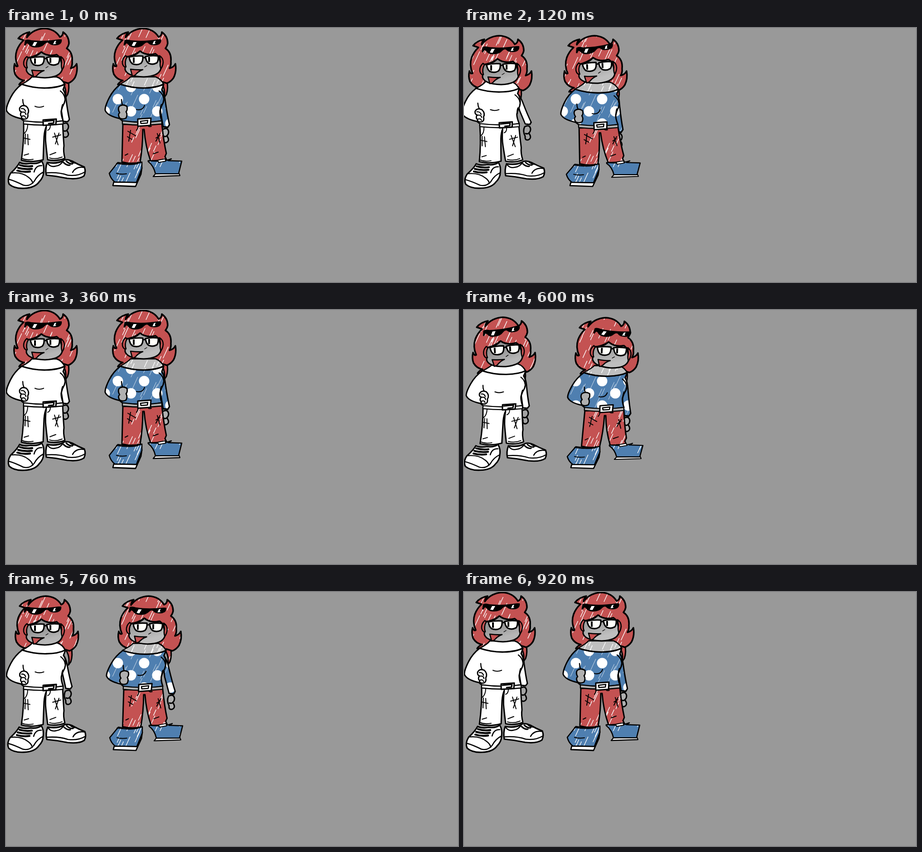
Recreate the animation shown at these times as an HTML page with a canvas. Size 998x561 px, loop 1.12 s.

```html
<!DOCTYPE html>
<html lang="en">
<head>
<meta charset="utf-8">
<title>Idle bounce</title>
<style>
html, body { margin: 0; width: 100%; height: 100%; overflow: hidden; background: #999; }
canvas { display: block; }
</style>
</head>
<body>
<canvas id="stage" width="998" height="561"></canvas>
<script>
const ctx = document.getElementById('stage').getContext('2d');
const RED = '#c45252', BLUE = '#4f7fb0', SKIN = '#b0b0b0', WHITE = '#fff';
const P = d => new Path2D(d);

const hair = P('M48 124L29 125Q31 120 40 116Q27 114 20 102Q16 91 19 79Q22 87 26 84Q18 66 24 49Q29 36 39 27L27 23Q36 12 52 9Q46 15 46 21Q60 2 85 1Q108 2 119 20Q126 17 126 9Q139 18 139 34Q138 40 134 45Q148 54 146 74Q147 82 143 89Q152 87 156 79Q159 96 152 110Q146 119 137 122L124 118Z');
const tail = P('M137 115Q141 133 136 147L131 154Q136 130 118 112Z');
const face = P('M45 94L45 66Q66 66 78 53Q92 64 112 59Q123 66 124 92Q119 109 86 110Q50 109 45 94Z');
const locks = P('M46 63Q38 70 39 80Q41 89 47 88Q43 77 49 66ZM121 63Q129 68 129 78Q128 87 124 92Q121 84 123 76Z');
const bangs = P('M45 66Q64 64 78 53Q92 64 112 59L121 66');
const lenses = P('M54 66Q68 63 84 64Q85 75 80 80Q72 85 61 81Q55 76 54 66ZM90 65Q104 62 118 64Q119 74 115 79Q106 84 97 80Q91 76 90 65ZM84 68L90 67M118 67L123 66');
const pupils = P('M62 67h4v12h-4ZM96 66h4v11h-4Z');
const mouth = P('M57 93Q72 95 84 94Q76 97 71 102Q66 108 61 108Z');
const nose = P('M88 88L93 85');
const shades = P('M40 38L42 27Q47 24 56 27Q84 30 117 25L123 25Q124 31 120 35Q114 39 106 38Q98 38 94 33Q90 31 86 35Q78 44 64 43Q54 43 49 35L46 34L43 39Z');
const glints = P('M62 31L69 31L64 40L58 39ZM107 29L111 28L109 33L111 35L104 36Z');

const torso = P('M35 124Q19 136 10 154Q0 174 1 182Q6 194 33 200L40 206Q85 213 126 205Q121 191 122 183Q124 174 129 165Q134 148 126 136L130 125Q124 112 112 108L57 108Q52 115 35 124Z');
const neck = P('M34 124Q60 133 88 132.5Q115 132 130 124Q124 113 112 108L57 108Q52 114 34 124Z');
const neckline = P('M34 124Q60 133 88 132.5Q115 132 130 124');
const folds = P('M37 158Q37 172 46 177M120 139Q129 146 130 156M125 169Q122 177 123 182');
const sleeve = P('M122 132Q131 138 133 160Q136 184 140 202L136 207L126 206L121 175Z');
const palm = P('M125 212Q136 206 138 217Q138 223 134 226Q142 237 133 241Q125 243 126 233Q120 222 125 212ZM127 227Q132 229 134 226');
const fist = P('M45 173Q35 168 30 177Q29 184 34 185Q30 192 34 195Q34 203 44 201Q50 198 48 190Q53 181 45 173Z');
const fingers = P('M34 178Q41 177 43 184M34 186Q43 184 44 191M35 195Q42 192 43 198');
const grip = P('M32 173Q40 167 49 173Q51 181 47 185Q51 191 47 199Q39 203 33 199Q28 191 33 187Q28 179 32 173Z');

const jeans = P('M39 209Q40 250 34 292Q55 298 82 291Q83 262 84 240Q85 226 89 217Q86 240 88 256Q90 275 92 291Q111 295 130 288Q126 272 128 260Q126 235 125 208Z');
const jeansInk = P('M40 233Q48 227 48 212M43 234L42 256M48 235L49 258M39 243L53 246M107 232L115 258M117 232L109 256M103 241L121 236M98 214Q98 224 92 226M40 281L50 278M35 288Q46 293 60 290M97 280L110 275M96 287Q110 291 124 285');
const pants = P('M40 213Q39 252 38 296Q58 301 78 297Q84 262 84 224L87 224Q90 262 101 293Q118 294 136 290L133 284L136 277Q130 250 126 211Z');
const pantsInk = P('M51 228L68 238M57 226L53 250M50 240L60 246M116 233L122 254M122 233L113 250M113 243L121 238M74 212Q74 222 70 226M93 212Q96 220 103 217M45 281L51 278M107 278L118 274');

const sneakL = P('M30 297Q25 307 10 321Q2 334 7 345Q18 355 40 354Q64 353 73 340Q83 330 83 318Q85 304 79 294Q70 301 55 299Q40 302 30 297Z');
const sneakLInk = P('M6 334Q20 338 38 347Q52 351 62 339Q70 324 83 318M13 320Q36 318 50 330Q58 336 59 343M79 304Q66 303 62 318');
const lacesL = P('M31 303Q44 307 58 305M27 309Q42 313 57 311M25 315Q38 319 53 317');
const sneakR = P('M91 297Q86 311 89 325Q112 327 135 332Q160 335 172 327Q177 317 173 307Q160 302 146 294Q132 288 126 293Q112 301 91 297Z');
const sneakRInk = P('M89 320Q116 318 136 325Q158 328 174 318M147 319Q154 305 173 308M93 300Q99 308 110 305Q120 304 126 294');
const lacesR = P('M127 297Q134 304 141 303M133 294Q140 301 147 300M140 292Q146 298 153 298');
const bootL = P('M29 297L10 321Q13 333 22 340L70 341L82 310L82 296Q64 303 29 297Z');
const soleL = P('M20 340L18 348L68 350L80 323L82 309L70 341Z');
const bootLInk = P('M26 299Q52 304 72 300L73 296M26 321Q36 324 48 322');
const bootR = P('M96 295Q108 304 112 322L163 322L170 294L140 293L147 289Q130 296 96 293Z');
const soleR = P('M112 322L107 328L166 326L164 321Z');
const cuffR = P('M117 292L133 289L135 294L119 297Z');
const bust = P('M70 180Q84 183 88 171');
const crease = P('M64 173Q73 177 83 173');

// Fixed screen textures: slanted scratches and polka dots.
let seed = 11;
const rnd = () => (seed = seed * 16807 % 2147483647) / 2147483647;
const hatch = new Path2D(), dots = new Path2D();
for (let i = 0; i < 300; i++) {
  const x = rnd() * 410, y = rnd() * 350 - 10, len = 9 + rnd() * 20;
  hatch.moveTo(x, y);
  hatch.lineTo(x - len * .46, y + len);
}
for (let row = 0; row < 4; row++) {
  for (let col = 0; col < 4; col++) {
    const x = 218 + col * 58 + (row % 2 ? 29 : 0), y = 130 + row * 27;
    dots.moveTo(x + 11.5, y);
    dots.arc(x, y, 11.5, 0, 7);
  }
}

function ink(path, w = 2, color = '#000') {
  ctx.strokeStyle = color;
  ctx.lineWidth = w;
  ctx.stroke(path);
}

function flat(path, fill) {
  ctx.fillStyle = fill;
  ctx.fill(path);
}

function paint(path, fill, w = 3, scratched = false, spotted = false) {
  flat(path, fill);
  if (scratched) {
    ctx.save();
    ctx.clip(path);
    ctx.setTransform(1, 0, 0, 1, 0, 0);
    if (spotted) flat(dots, WHITE);
    ink(hatch, spotted ? 1 : 1.4, spotted ? 'rgba(255,255,255,.75)' : WHITE);
    ctx.restore();
  }
  ink(path, w);
}

// Shear and stretch a part so its top and bottom follow separate offsets.
function span(ox, y0, x0, dy0, y1, x1, dy1) {
  const kx = (x1 - x0) / (y1 - y0), ky = (dy1 - dy0) / (y1 - y0);
  ctx.setTransform(1, 0, kx, 1 + ky, ox + x0 - kx * y0, dy0 - ky * y0);
}

function place(ox, x, y, turn = 0, cx = 0, cy = 0) {
  ctx.setTransform(1, 0, 0, 1, ox + x + cx, y + cy);
  ctx.rotate(turn);
  ctx.translate(-cx, -cy);
}

function belt(color) {
  paint(P('M39 205Q84 211 126 205L126 212Q84 217 39 212Z'), color ? SKIN : WHITE, 2.4);
  if (color) {
    paint(P('M73 201L102 199L101 215L73 217Z'), WHITE, 3);
    ink(P('M79 206L95 204L94 210L80 211Z'), 2.6);
  } else {
    paint(P('M82 203L111 201L110 213L82 215Z'), WHITE, 3.2);
    ink(P('M85 206L106 204L105 210L94 211'), 3);
  }
}

function drawFigure(ox, pose, color) {
  const [hx, hy, fx, fy, sx, sy, turn, nx, ny, wx, wy, ax, ay, tx, lx, rx] = pose;
  const ankle = wy * .5;

  place(ox, tx, hy * .9);
  paint(tail, RED, 3, true);
  place(ox, hx, hy);
  paint(hair, RED, 3.5, true);

  place(ox, ax, ay);
  paint(palm, color ? SKIN : '#a3a3a3', 3);
  span(ox, 135, nx, ny, 205, ax, ay);
  paint(sleeve, color ? BLUE : WHITE, 3, color, color);

  span(ox, 210, wx, wy, 295, (lx + rx) / 2, ankle);
  paint(color ? pants : jeans, color ? RED : WHITE, 3, color);
  ink(color ? pantsInk : jeansInk, 2);

  span(ox, 295, rx, ankle, 350, rx, 0);
  if (color) {
    paint(soleR, WHITE, 2.3);
    paint(bootR, BLUE, 2.6, true);
    paint(cuffR, WHITE, 2);
  } else {
    paint(sneakR, WHITE, 3.2);
    ink(sneakRInk, 2.6);
    ink(lacesR, 3.2);
  }
  span(ox, 295, lx, ankle, 350, lx, 0);
  if (color) {
    paint(soleL, WHITE, 2.8);
    paint(bootL, BLUE, 2.6, true);
    ink(bootLInk, 2);
  } else {
    paint(sneakL, WHITE, 3.2);
    ink(sneakLInk, 2.6);
    ink(lacesL, 4.4);
  }

  span(ox, 128, nx, ny, 208, wx, wy);
  paint(torso, color ? BLUE : WHITE, 3, color, color);
  if (color) paint(neck, '#bfbfbf', 2.4, true);
  ink(neckline, 3.2);
  ink(folds, 2.4);
  ink(color ? bust : crease, 2.2);
  belt(color);
  paint(color ? grip : fist, color ? SKIN : WHITE, 2.8);
  if (!color) ink(fingers, 2.3);

  drawFace(ox, fx, fy, turn * .5, color);
  place(ox + (color ? 1.5 : 0), sx, sy, turn, 82, 34);
  flat(shades, '#000');
  flat(glints, WHITE);
}

function drawFace(ox, x, y, turn, color) {
  place(ox, x, y, turn, 86, 75);
  const shade = ctx.createLinearGradient(80, 70, 88, 100);
  shade.addColorStop(0, color ? '#a2a2a2' : '#929292');
  shade.addColorStop(1, color ? '#bfbfbf' : '#b6b6b6');
  paint(face, shade, 3);
  ink(bangs, 3.4);
  paint(locks, RED, 2.6);
  paint(lenses, '#fffffa', 3.2);
  flat(pupils, '#000');
  ink(nose, 1.4);
  paint(mouth, RED, 2.6);
}

// hair x y, face x y, shades x y turn, neck x y, waist x y, hand x y, tail x, feet x x
const plain = {
  rest: Array(16).fill(0),
  left: [-7, 16, -4, 15, -1, 15, 0, -8, 9, -4, 6, 9, 6, -12, -3, 3],
  leftUp: [-3, 8, 0, 7, 1, 8, 0, -4, 4, -2, 3, 4, 6, -5, -1, 1],
  right: [1, 15, 4, 15, 1, 14, -.12, 6, 10, 3, 6, 4, 10, -3, -4, 7],
  rightUp: [3, 8, 0, 7, -1, 7, 0, 1, 4, 0, 3, 6, 7, 7, -1, 1]
};
const bright = {
  rest: [0, 0, 0, -2, 0, 0, 0, 0, 0, 0, 0, 3, 12, 0, 0, 0],
  left: [-15, 16, -10, 12, -13, 13, -.1, -7, 11, -4, 8, -7, 23, -14, -2, 1],
  leftUp: [-10, 8, -3, 5, -6, 8, -.08, -4, 5, -3, 4, -4, 16, -6, -1, 1],
  right: [10, 16, 22, 18, 26, 18, .12, 12, 14, 9, 10, 10, 27, 4, 0, 7],
  rightUp: [12, 8, 9, 5, 11, 8, .04, 5, 5, 2, 3, 16, 18, 8, 1, 2]
};

const mix = (a, b, k) => a.map((v, i) => v + (b[i] - v) * k);
const routine = p => [
  p.rest, mix(p.left, p.leftUp, -.1), p.left, p.leftUp, mix(p.leftUp, p.rest, .65),
  p.rest, p.right, mix(p.right, p.rightUp, .4), p.rightUp, mix(p.rightUp, p.rest, .65), p.rest
];
const plainSteps = routine(plain), brightSteps = routine(bright);
const starts = [0, 40, 120, 200, 280, 360, 600, 680, 760, 840, 920];
const LOOP = 1120;

ctx.lineJoin = ctx.lineCap = 'round';

function draw(now) {
  const t = now % LOOP;
  const step = starts.filter(s => s <= t).length - 1;
  ctx.setTransform(1, 0, 0, 1, 0, 0);
  ctx.fillStyle = '#999';
  ctx.fillRect(0, 0, 998, 561);
  drawFigure(0, plainSteps[step], false);
  drawFigure(218, brightSteps[step], true);
}

let origin;
function tick(now) {
  origin ??= now;
  draw(Math.max(0, now - origin));
  requestAnimationFrame(tick);
}
draw(0);
requestAnimationFrame(tick);
</script>
</body>
</html>
```
